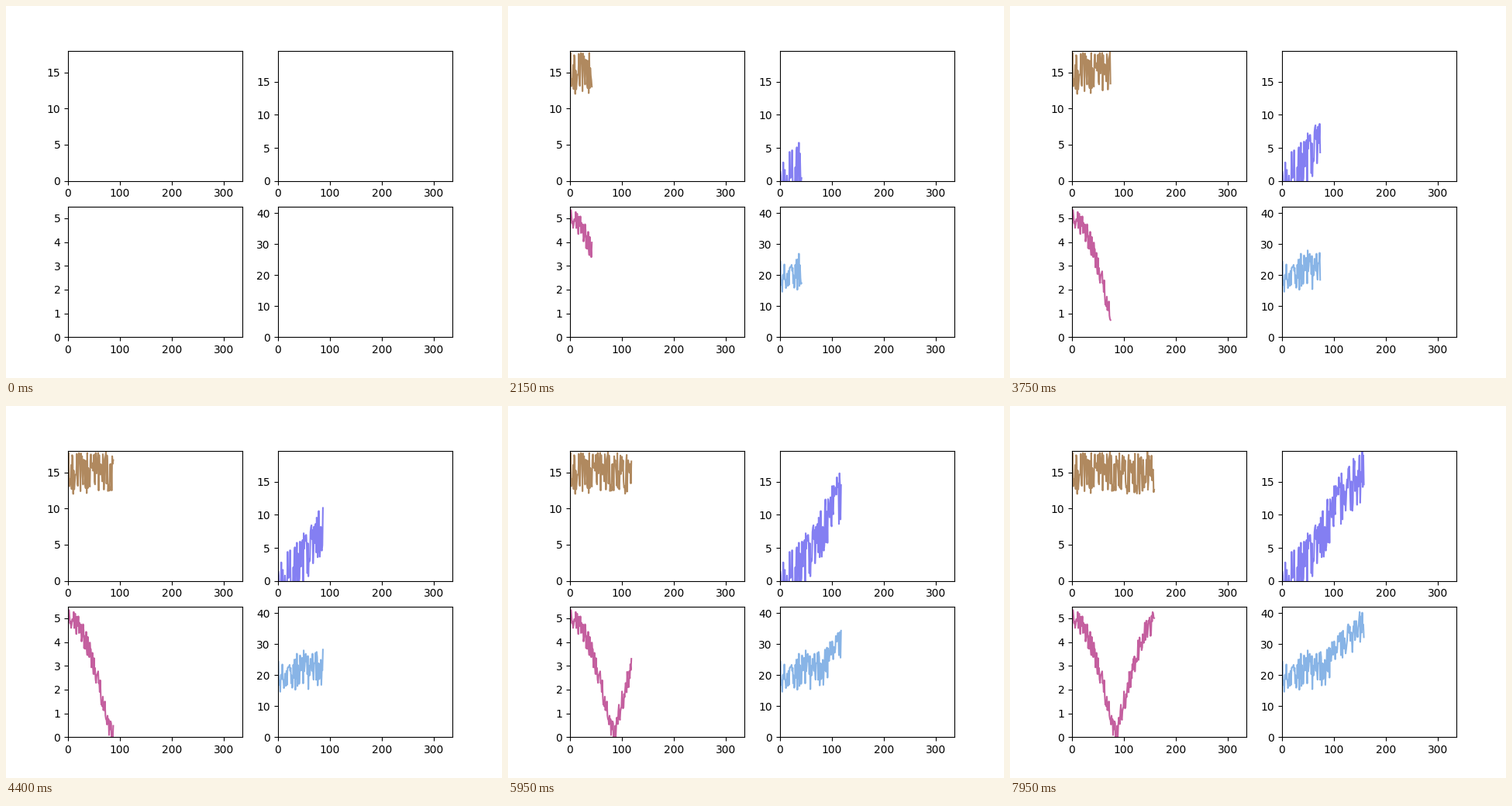
A matplotlib script for the animation above (8000 ms loop, 640 px wide and 480 px high).

```python
import numpy as np
import matplotlib.pyplot as plt
from matplotlib.animation import FuncAnimation

FRAMES, INTERVAL = 160, 50
PERIOD = 336

rng = np.random.default_rng(12)
x = np.arange(FRAMES)
wave = np.cos(2 * np.pi * x / PERIOD)


def noise(spread):
    return rng.uniform(-spread, spread, FRAMES)


# Three noisy trends; the fourth panel is their sum.
base = 15 + noise(3)
rise = 8 - 8 * wave + noise(4)
dip = 5 * np.abs(wave) + noise(0.5)

panels = [
    (base, 18, "#b0895f"),
    (rise, 19.73, "#847ff2"),
    (dip, 5.48, "#c45f9f"),
    (base + rise + dip, 42, "#88b4e6"),
]

fig, axes = plt.subplots(2, 2, figsize=(6.4, 4.8), dpi=100)
lines = []
for ax, (_, top, color) in zip(axes.flat, panels):
    ax.set_xlim(0, PERIOD)
    ax.set_ylim(0, top)
    lines += ax.plot([], [], color=color, lw=1.5)


def update(n):
    for line, (y, _, _) in zip(lines, panels):
        line.set_data(x[:n], y[:n])
    return lines


anim = FuncAnimation(fig, update, frames=FRAMES, interval=INTERVAL,
                     init_func=lambda: update(0), repeat=True, repeat_delay=0)
plt.show()
```
